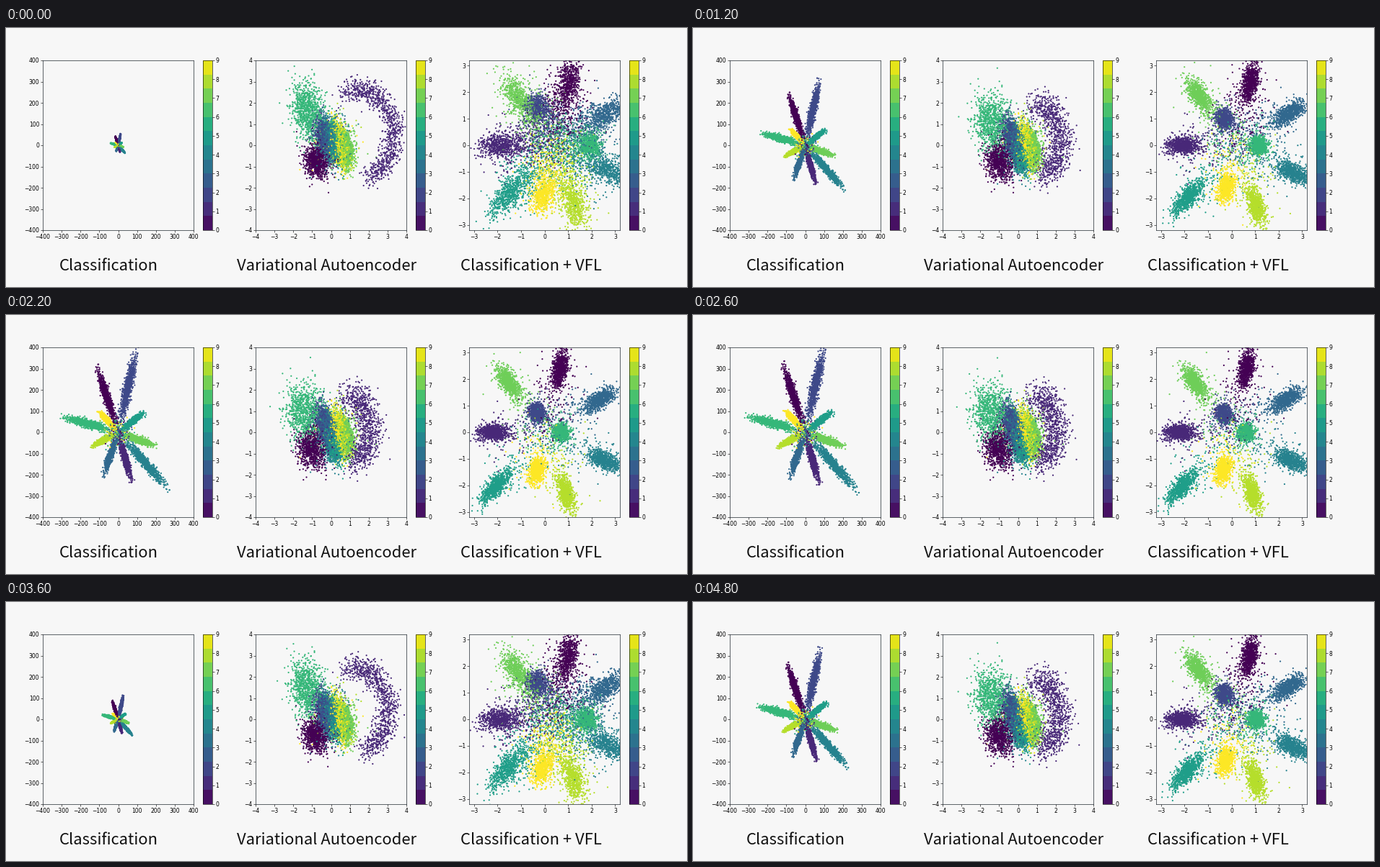
Write a matplotlib script that moves like this. It is 944x360 px and loops after 5 s.

```python
import numpy as np
import matplotlib.pyplot as plt
from matplotlib.animation import FuncAnimation
from matplotlib.cm import ScalarMappable
from matplotlib.colors import ListedColormap, Normalize

W, H, DPI = 944, 360, 80
PX = 72 / DPI  # points per pixel
BACK = "#f7f7f7"
FRAMES, INTERVAL, RESTART = 25, 200, 16
CLASSES, PER_CLASS = 10, 900
COUNT = CLASSES * PER_CLASS

rng = np.random.default_rng(4)
labels = rng.permutation(np.repeat(np.arange(CLASSES), PER_CLASS))
VIRIDIS = plt.get_cmap("viridis")
BANDED = ListedColormap(VIRIDIS((np.arange(12) + .5) / 12))


class Noise:
    """Fixed random numbers per dot, so that dots glide between steps."""

    def __init__(self):
        self.core = rng.normal(size=(COUNT, 2))
        self.wide = rng.normal(size=(COUNT, 2))
        self.pull = rng.random(COUNT)
        self.rank = rng.random(COUNT)


star_noise, vae_noise, vfl_noise = Noise(), Noise(), Noise()


def settle(step, pace):
    """0 at the first step, easing out to 1."""
    return 1 - np.exp(-(step - 1) / pace)


def mix(start, end, u):
    return start + (np.asarray(end) - start) * u


def polar(radius, angle):
    return np.stack((radius * np.cos(angle), radius * np.sin(angle)), axis=-1)


def tilted(noise, long, short, angle):
    """Gaussian offsets, stretched along the given angle."""
    return (polar(noise.core[:, 0] * long, angle)
            + polar(noise.core[:, 1] * short, angle + np.pi / 2))


# Star arms, anticlockwise: nearly even angles with a slow wobble
ARM_ORDER = [5, 2, 0, 9, 6, 8, 3, 1, 4, 7]
ARM_LENGTHS = np.array([180, 430, 350, 155, 325, 170, 235, 255, 400, 230])
turn = np.arange(CLASSES)
arm_angle, arm_length = np.empty(CLASSES), np.empty(CLASSES)
arm_angle[ARM_ORDER] = np.radians(34 + 35 * turn + 8 * np.sin(turn * 2 * np.pi / 5.4))
arm_length[ARM_ORDER] = ARM_LENGTHS


def star(step):
    growth = 1.03 * (1 - np.exp(-step / 5.5)) ** 1.2
    length, angle = arm_length[labels] * growth, arm_angle[labels]
    reach = np.clip(.57 + .18 * star_noise.core[:, 0], .02, 1.08)
    width = .021 * length + 3 * growth
    points = (polar(length * reach, angle)
              + polar(width * star_noise.core[:, 1], angle + np.pi / 2))
    lost = star_noise.rank < .03
    points[lost] = star_noise.wide[lost] * 38 * growth
    return points


STRANDS = [2, 3, 4, 5, 9, 8, 7]  # left to right in the middle of the latent space


def vae(step):
    u = settle(step, 4)
    centre = np.zeros((CLASSES, 2))
    long, short = np.full(CLASSES, .45), np.full(CLASSES, .19)
    across = np.linspace(0, 1, len(STRANDS))
    sink = .95 * u * np.exp(-((across - .42) / .14) ** 2)
    centre[STRANDS] = np.column_stack((-.4 + 1.2 * across, .35 - .5 * across - sink))
    centre[0] = mix((-.75, -.75), (-1, -.75), u)
    centre[6] = mix((-1.25, 1.65), (-1.4, .9), u)
    long[0], short[0] = mix(.38, .48, u), mix(.3, .38, u)
    long[6], short[6] = .64, mix(.42, .54, u)
    points = centre[labels] + tilted(vae_noise, long[labels], short[labels],
                                     np.radians(102))
    lost = vae_noise.rank < .06
    points[lost] = centre[labels[lost]] * .6 + vae_noise.wide[lost] * .65

    # Class 1 is a half ring that shrinks and thickens
    ring = labels == 1
    angle = np.radians(mix(-72, mix(112, 85, u), vae_noise.pull[ring]))
    arc = np.column_stack((np.cos(angle), np.sin(angle)))
    points[ring] = (mix((1.45, .5), (.8, .1), u) + arc * mix((1.9, 2.1), (1.15, 1.55), u)
                    + mix(.27, .37, u) * vae_noise.core[ring])
    return points


# Where each class ends up when trained
HOMES = np.array([(.63, 2.4), (-2.2, 0), (-.32, .68), (2.3, 1.22), (2.55, -1.06),
                  (-2.1, -2.05), (.6, 0), (-1.55, 1.9), (.87, -2.3), (-.35, -1.4)])
home_radius = np.hypot(*HOMES.T)
home_angle = np.arctan2(HOMES[:, 1], HOMES[:, 0])


def vfl(step):
    # Classes set out at similar radii, shifted right, and part towards home
    early = max(0, 1 - (step - 1) / 13) ** 1.4
    radius = mix(home_radius, 2.4, .5 * early)
    centre = (polar(radius, home_angle) + (.4 * early, 0))[labels]
    spread = 1.4 - .4 * settle(step, 3)
    points = centre + tilted(vfl_noise, spread * (.11 + .095 * home_radius[labels]),
                             spread * .155, home_angle[labels])
    lost = vfl_noise.rank < .42 - .32 * settle(step, 4)
    hub = np.array((.4, 0)) * early
    points[lost] = (mix(hub, centre, vfl_noise.pull[:, None] ** .7)
                    + .5 * vfl_noise.wide)[lost]
    return points


def box(x, y, w, h):
    return [x / W, 1 - (y + h) / H, w / W, h / H]


def style(ax):
    ax.tick_params(length=2.6 * PX, width=.6 * PX, pad=2 * PX, labelsize=7.6 * PX)


def panel(left, limit, ticks, title, title_x):
    ax = fig.add_axes(box(left, 45, 209, 236), facecolor=BACK)
    ax.set(xlim=(-limit, limit), ylim=(-limit, limit), xticks=ticks, yticks=ticks)
    for spine in ax.spines.values():
        spine.set(linewidth=.7 * PX, edgecolor="#202830")
    style(ax)
    dots = ax.scatter(np.zeros(COUNT), np.zeros(COUNT), c=labels, cmap=VIRIDIS,
                      vmin=0, vmax=9, s=(2.2 * PX) ** 2, linewidths=0)
    cax = fig.add_axes(box(left + 222, 45, 13, 236))
    bar = fig.colorbar(ScalarMappable(Normalize(0, 9), BANDED), cax=cax,
                       ticks=range(10))
    bar.outline.set_linewidth(.6 * PX)
    style(cax)
    fig.text(title_x / W, 1 - 337 / H, title, ha="center", va="baseline",
             fontsize=22 * PX, family="Noto Sans CJK JP", color="#111111")
    return dots


plt.rcParams["font.family"] = "DejaVu Sans"
fig = plt.figure(figsize=(W / DPI, H / DPI), dpi=DPI, facecolor=BACK)
panels = [
    (panel(51, 400, range(-400, 401, 100), "Classification", 142), star),
    (panel(346, 4, range(-4, 5), "Variational Autoencoder", 445), vae),
    (panel(642, 3.2, range(-3, 4), "Classification + VFL", 727.5), vfl)]


def update(frame):
    # Training starts over part way through the loop, from a single spot
    step = frame + 1 if frame < RESTART else frame - RESTART
    for dots, model in panels:
        dots.set_offsets(model(step) if step else model(1) * .012)
    return [dots for dots, _ in panels]


anim = FuncAnimation(fig, update, frames=FRAMES, interval=INTERVAL,
                     repeat=True, repeat_delay=0)
plt.show()
```
